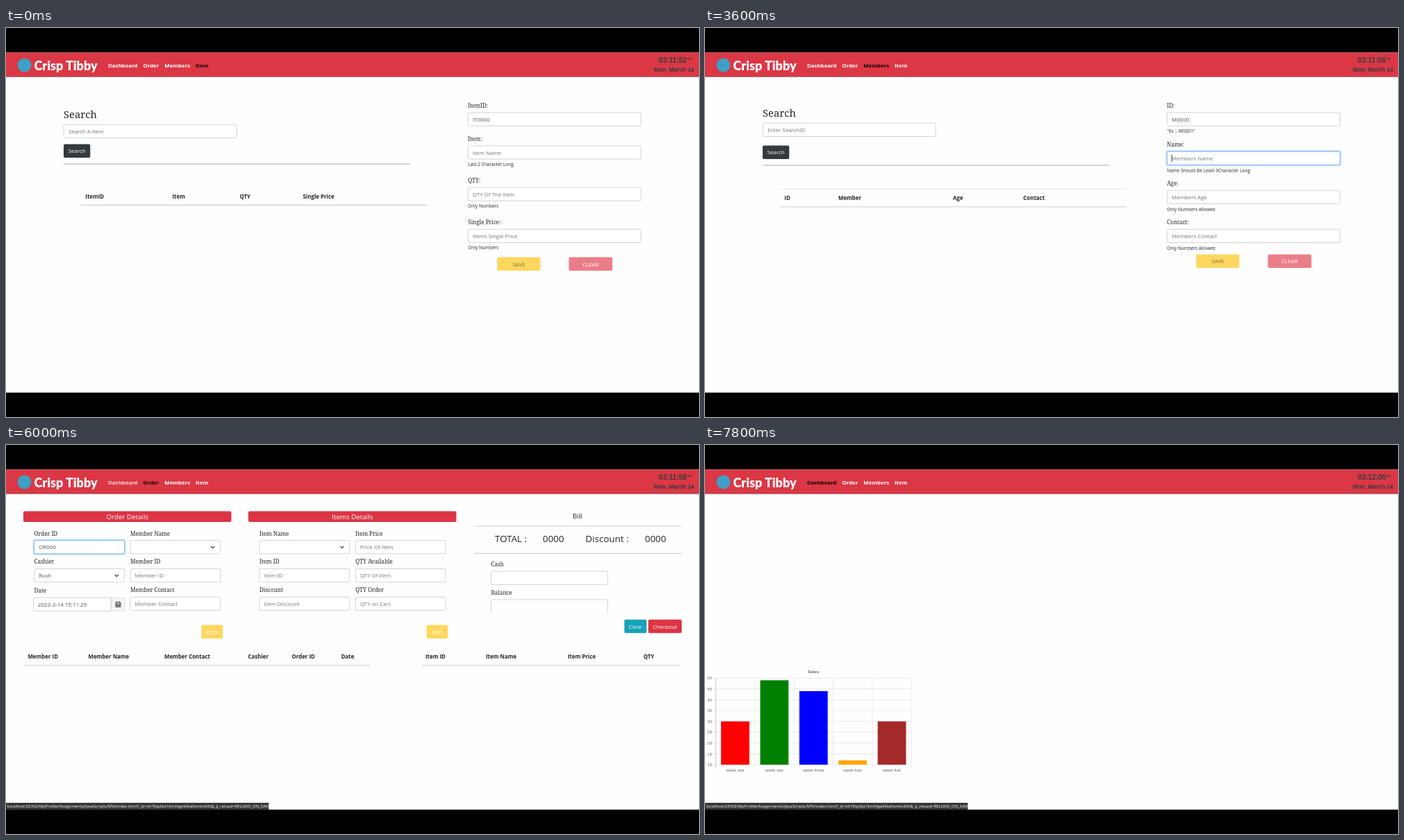
An HTML page for the animation above (8 s loop, 998 px wide and 561 px high).

```html
<!DOCTYPE html>
<html lang="en">
<head>
<meta charset="utf-8">
<title>Shop manager</title>
<style>
html, body { margin: 0; width: 100%; height: 100%; overflow: hidden; background: #000; }
svg { display: block; width: 100vw; height: 100vh; }
text { font-family: "Open Sans", "Noto Sans", sans-serif; font-size: 7.9px; fill: #495057; white-space: pre; }
.ph { fill: #6c757d; }
.th { font-weight: 700; fill: #212529; }
.help { font-size: 6.5px; fill: #212529; }
.label { font-family: "Noto Serif", serif; font-size: 8.05px; fill: #212529; }
.head { font-family: "Noto Serif", serif; font-size: 14.8px; fill: #212529; }
.title { font-size: 9.8px; fill: #212529; }
.total { font-size: 13.4px; fill: #212529; }
.white { fill: #fff; }
.muted { fill: #79704f; }
.mid { text-anchor: middle; }
.end { text-anchor: end; }
.nav { font-size: 7.85px; font-weight: 700; }
.brand { font-family: Lato, sans-serif; font-weight: 900; font-size: 18px; fill: #fff; }
.clock { font-family: "Liberation Sans", Arial, sans-serif; font-weight: 700; fill: #343a40; }
.tick { font-family: "Liberation Sans", Arial, sans-serif; font-size: 6.2px; fill: #666; }
.tip { font-size: 6px; fill: #fff; }
.focus { stroke: #80bdff; }
</style>
</head>
<body>
<svg id="stage" viewBox="0 0 998 561" preserveAspectRatio="none"></svg>
<script>
const LOOP = 8000, STEP = 200;
const NAV = [['Dashboard', 147], ['Order', 197.5], ['Members', 228.3], ['Item', 273]];
const RED = '#dc3545', YELLOW = '#ffd75e', PINK = '#ea7e88', TEAL = '#17a2b8', DARK = '#343a40';

const text = (x, y, s, cls = '', more = '') => `<text x="${x}" y="${y}" class="${cls}" ${more}>${s}</text>`;
const rect = (x, y, w, h, fill, more = '') =>
  `<rect x="${x}" y="${y}" width="${w}" height="${h}" fill="${fill}" ${more}/>`;
const line = (x1, x2, y, color = '#cfd2d6', w = 1.4) =>
  `<path d="M${x1} ${y}H${x2}" stroke="${color}" stroke-width="${w}"/>`;
const group = (id, body) => `<g id="${id}">${body}</g>`;

const field = (x, y, w, s = '', cls = 'ph') =>
  rect(x, y, w, 19.3, '#fff', 'rx="2" stroke="#ced4da"') + text(x + 6.6, y + 12.8, s, cls);

const focusField = (name, x, y, w, s, cls, caretX) =>
  group(name + 'Glow', rect(x - 1, y - 1, w + 2, 21.3, 'none', 'rx="3" stroke="#bfdeff" stroke-width="1.8"')) +
  field(x, y, w, s, cls) +
  group(name + 'Ring', rect(x, y, w, 19.3, 'none', 'rx="2" class="focus"')) +
  group(name + 'Caret', rect(caretX, y + 4.8, 0.9, 10.4, '#222'));

const button = (x, y, w, s, fill, cls = 'white') =>
  rect(x, y, w, 19.5, fill, 'rx="2"') + text(x + w / 2, y + 12.9, s, cls + ' mid');

const headers = (y, cols) => cols.map(([s, x]) => text(x, y, s, 'th')).join('');
const chevron = (x, y) =>
  `<path d="M${x - 2.6} ${y - 1.3}l2.6 2.6 2.6-2.6" fill="none" stroke="${DARK}" stroke-width="1.1"/>`;

const saveClear = y => button(707.3, y, 62.3, 'SAVE', YELLOW, 'muted') + button(810.6, y, 62.7, 'CLEAR', PINK);

const searchBox = (y, hint, gap, rule) =>
  text(83, y, 'Search', 'head') + field(83.3, y + 9.7, 249, hint) +
  button(83, y + gap, 38.3, 'Search', DARK) + line(83, 582, rule, '#c4c4c4');

function itemPage() {
  const rows = [['Item:', 'Item Name', 'Last 2 Character Long'],
    ['QTY:', 'QTY Of The Item', 'Only Numbers'],
    ['Single Price:', 'Items Single Price', 'Only Numbers']];
  return searchBox(129.6, 'Search A Item', 37.8, 196) +
    headers(245.6, [['ItemID', 114.3], ['Item', 239.5], ['QTY', 336.5], ['Single Price', 427.5]]) +
    line(108, 607, 255.5) +
    text(665.3, 115, 'ItemID:', 'label') + field(665.5, 122, 249, 'IT0000', '') +
    rows.map(([name, hint, help], i) => {
      const y = 163 + i * 60.2;
      return text(665.3, y, name, 'label') + field(665.5, y + 6.8, 249, hint) + text(665.3, y + 36, help, 'help');
    }).join('') + saveClear(330.6);
}

function memberPage() {
  const rows = [['ID:', 'M0000', '"Ex :- M0001"'],
    ['Name:', 'Members Name', 'Name Should Be Least 3Character Long'],
    ['Age:', 'Members Age', 'Only Numbers Allowed'],
    ['Contact:', 'Members Contact', 'Only Numbers Allowed']];
  return searchBox(127.5, 'Enter SearchID', 42, 198) +
    line(108, 607, 232, '#dee2e6', 1) +
    headers(247.7, [['ID', 114.3], ['Member', 192], ['Age', 357], ['Contact', 458.3]]) +
    line(108, 607, 257.8, '#d5d9dd', 1.2) +
    rows.map(([name, value, help], i) => {
      const y = 115 + i * 56.1, top = y + 7;
      const box = i === 1 ? focusField('member', 665.5, top, 249, value, 'ph', 671.6)
        : field(665.5, top, 249, value, i ? 'ph' : '');
      return text(665.3, y, name, 'label') + box + text(665.3, y + 36.4, help, 'help');
    }).join('') + saveClear(326.4);
}

function orderPage() {
  const top = [137.6, 178.5, 219.2];
  const cells = [
    [179, ['Member Name', ''], ['Member ID', 'Member ID'], ['Member Contact', 'Member Contact']],
    [365, ['Item Name', ''], ['Item ID', 'Item ID'], ['Discount', 'Item Discount']],
    [503.3, ['Item Price', 'Price Of Item'], ['QTY Available', 'QTY Of Item'], ['QTY Order', 'QTY on Cart']]];
  const card = (x, s) => rect(x, 95.6, 299.5, 15.4, RED, 'rx="2"') + text(x + 149.8, 106.7, s, 'title white mid');
  const calendar = `<path d="M158 227h7v6.5h-7zM158 229.2h7M160.2 229v4.500M162.8 229v4.500M158 231.400h7M159.700 225.300v2M163.300 225.300v2"
    fill="none" stroke="${DARK}" stroke-width="0.9"/>`;
  return card(25, 'Order Details') + card(349, 'Items Details') +
    cells.map(([x, ...col]) => col.map(([name, hint], i) =>
      text(x, top[i] - 7.1, name, 'label') + field(x, top[i], 129.7, hint)).join('')).join('') +
    chevron(297.6, 147.3) + chevron(484, 147.3) +
    text(40.5, 130.5, 'Order ID', 'label') + focusField('order', 40.6, 137.6, 130, 'OR000', '', 72) +
    text(40.5, 171.4, 'Cashier', 'label') + field(40.6, 178.5, 130, 'Ruvil', '') + chevron(159.3, 188.3) +
    text(40.5, 213, 'Date', 'label') +
    rect(151, 220.2, 20.2, 19, '#f4f5f6', 'stroke="#ced4da" stroke-width=".6"') +
    field(39.5, 220.2, 111.5, '2022-3-14 15:11:29', '') + calendar +
    button(281.5, 259.6, 30.5, 'ADD', YELLOW) + button(605.7, 259.6, 30.5, 'ADD', YELLOW) +
    text(823, 106.3, 'Bill', 'title mid') + line(674, 973, 117, '#d2d2d2', 1) + line(674, 973, 156.4, '#c8c8c8', 1) +
    [['TOTAL :', 704], ['0000', 773], ['Discount :', 834.6], ['0000', 920]]
      .map(([s, x]) => text(x, 140, s, 'total')).join('') +
    text(698.6, 174.7, 'Cash', 'label') + field(698.7, 182, 168, '') +
    text(698.6, 215.7, 'Balance', 'label') + field(698.7, 223, 168, '') + rect(697, 242, 172, 2, '#fefefe') +
    button(890.5, 251.8, 32, 'Clear', TEAL) + button(925, 251.8, 48, 'Checkout', RED) +
    headers(308.3, [['Member ID', 31.4], ['Member Name', 118.5], ['Member Contact', 228], ['Cashier', 348.5],
      ['Order ID', 411.5], ['Date', 482.7], ['Item ID', 604], ['Item Name', 691], ['Item Price', 809], ['QTY', 918]]) +
    line(25, 524, 317.9) + line(599, 972, 317.9);
}

function chart() {
  const bars = [['one', 30, 'red'], ['two', 49, 'green'], ['three', 44, 'blue'], ['four', 12, 'orange'], ['five', 30, 'brown']];
  const yOf = v => 461 - (v - 10) * 3.12;
  let out = text(156, 329.4, 'Sales', 'tick mid', 'font-weight="700"');
  for (let v = 10; v <= 50; v += 5)
    out += line(11, 297, yOf(v), '#e6e6e6', 0.9) + text(10.2, yOf(v) + 2.1, v, 'tick end');
  for (let i = 0; i <= 5; i++)
    out += rect(15.2 + i * 56.35, 336, 0.8, 130, i ? '#e9e9e9' : '#bdbdbd');
  bars.forEach(([name, v, color], i) => {
    const x = 43.5 + i * 56.4;
    out += rect(x - 20.4, yOf(v), 40.8, 461 - yOf(v), color) + text(x, 470.6, 'week ' + name, 'tick mid');
  });
  return out;
}

function dashboardPage() {
  const fruit = `<ellipse cx="135" cy="294" rx="58" ry="25" fill="url(#shade)"/>
    <path d="M132 102.500C186 102.500 225 141 224.600 190C224 243 184 288.500 133 288.500C80 288.500 41 241 41 188C41 139 80 102.500 132 102.500Z" fill="url(#peel)"/>
    <circle cx="152.300" cy="160.500" r="9" fill="#c96b10" opacity=".35"/>
    <circle cx="152.300" cy="160.500" r="5.800" fill="#9a6a45"/>
    <circle cx="152.300" cy="160" r="3" fill="#b89a7c"/>`;
  return `<g clip-path="url(#window)"><g id="slide">${fruit}` +
    text(135, 260.3, 'Second slide label', 'title white mid') +
    text(134, 275.6, 'Some representative placeholder content for', 'white mid') +
    text(134, 287.8, 'the second slide.', 'white mid') + '</g>' +
    '<path d="M31.500 191.500l-4 4.200 4 4.200" fill="none" stroke="#fff" stroke-width="2" opacity=".55"/></g>' + chart();
}

const stage = document.getElementById('stage');
stage.innerHTML = `<defs>
  <radialGradient id="peel" cx=".42" cy=".4" r=".62">
    <stop offset="0" stop-color="#ff9d16"/><stop offset=".55" stop-color="#fb8c0c"/>
    <stop offset=".85" stop-color="#ee7708"/><stop offset="1" stop-color="#dc6410"/>
  </radialGradient>
  <radialGradient id="shade">
    <stop offset="0" stop-color="#b98a72" stop-opacity=".75"/><stop offset=".5" stop-color="#d9cfd2" stop-opacity=".6"/>
    <stop offset="1" stop-color="#eee" stop-opacity="0"/>
  </radialGradient>
  <clipPath id="window"><rect x="10" y="71" width="250" height="252"/></clipPath>
</defs>` +
  rect(0, 0, 998, 561, '#000') + rect(0, 35.4, 998, 490.4, '#fefefe') +
  rect(0, 35.4, 998, 34.8, '#db3745') + rect(0, 70, 998, 0.8, '#8d6f72') +
  '<circle cx="26.500" cy="53.500" r="10" fill="#3f9fc4"/>' + text(40.5, 60.8, 'Crisp Tibby', 'brand') +
  NAV.map(([s, x], i) => text(x, 56.6, s, 'nav', `id="nav${i}"`)).join('') +
  text(940, 50, '', 'clock', 'id="clock" style="font-size:10.2px"') +
  text(981.3, 46, 'PM', 'clock', 'style="font-size:4.2px"') +
  text(991, 63, 'Mon, March 14', 'clock end', 'style="font-size:8.35px"') +
  [dashboardPage, orderPage, memberPage, itemPage].map((page, i) => group('page' + i, page())).join('') +
  group('tip', rect(0, 516, 378.5, 10, '#383838') +
    text(1.8, 523.4, 'localhost:63342/MyProfile/Assignments/JavaScripts/SPA/index.html?_ijt=sh7ktpt6a16rnhlgek9se0vmkv65t&amp;_ij_reload=RELOAD_ON_SAVE#', 'tip'));

const el = {};
stage.querySelectorAll('[id]').forEach(n => el[n.id] = n);
const show = (id, on) => el[id].style.display = on ? '' : 'none';
const within = (t, a, b) => t >= a && t < b;

// Each visit: hover begins, link is clicked, page opened, page left.
const VISITS = [[1800, 2400, 3, 2], [3800, 4400, 2, 1], [5800, 6200, 1, 0], [7600, 9000, 0, 0]];
const TICKS = [200, 1200, 2200, 3200, 4200, 5200, 6400, 7200];

// CSS ease-in-out, solved by bisection.
function easeInOut(x) {
  if (x <= 0 || x >= 1) return x <= 0 ? 0 : 1;
  let lo = 0, hi = 1, s;
  for (let i = 0; i < 20; i++) {
    s = (lo + hi) / 2;
    const at = 1.26 * s * (1 - s) ** 2 + 1.74 * s * s * (1 - s) + s ** 3;
    if (at < x) lo = s; else hi = s;
  }
  return 3 * s * s - 2 * s ** 3;
}

function draw(time) {
  const t = Math.floor(time % LOOP / STEP) * STEP;
  let page = 3, tip = 0;
  const colors = ['#fff', '#fff', '#fff', '#fff'];
  const last = VISITS.filter(v => t >= v[1]).pop();
  if (last) page = last[3];
  colors[page] = '#0b0608';
  for (const [hover, click, from, to] of VISITS) {
    if (within(t, hover, click)) {
      tip = t === hover ? 0.52 : 1;
      if (t > hover && from !== to) colors[to] = '#f8d7da';
    } else if (t === click) {
      tip = 0.7;
      colors[from] = '#2b1a1d';
      colors[to] = '#f4cdd0';
    }
  }
  for (let i = 0; i < 4; i++) {
    show('page' + i, i === page);
    el['nav' + i].style.fill = colors[i];
  }
  el.tip.style.opacity = tip;

  const secs = 52 + TICKS.filter(k => t >= k).length;
  el.clock.textContent = `03:${11 + Math.floor(secs / 60)}:${String(secs % 60).padStart(2, '0')}`;

  show('memberCaret', within(t, 2400, 3200) || t >= 3600);
  show('orderCaret', within(t, 4400, 4800) || within(t, 5400, 6000));
  el.slide.setAttribute('transform', `translate(${-250 * easeInOut((t - 7252) / 600)} 0)`);
}

const start = performance.now();
function loop() {
  draw(performance.now() - start);
  requestAnimationFrame(loop);
}
draw(0);
requestAnimationFrame(loop);
</script>
</body>
</html>
```
